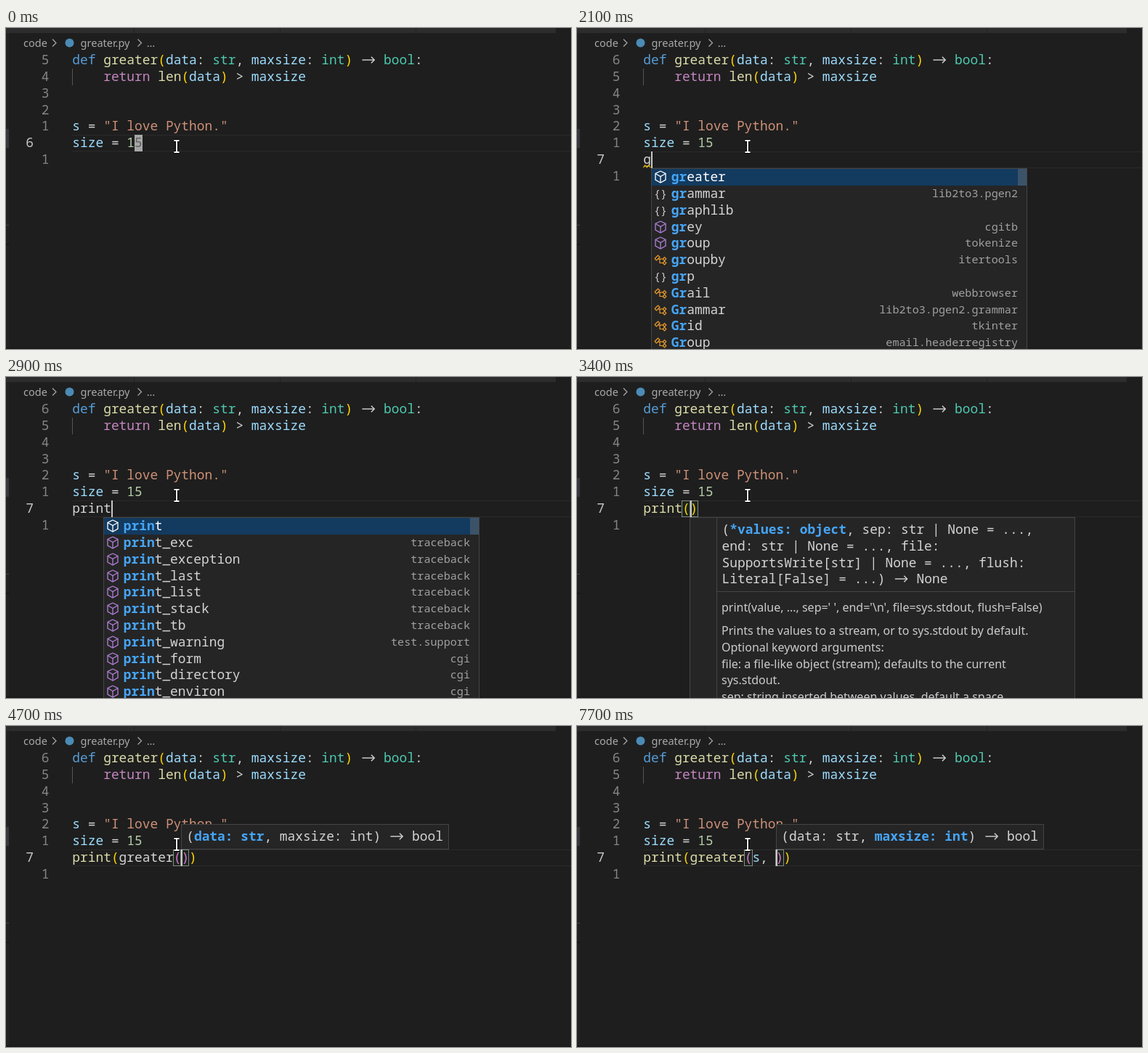
An HTML page with a canvas for the animation above (8 s loop, 778 by 442 pixels).

```html
<!DOCTYPE html>
<html lang="en">
<head>
<meta charset="utf-8">
<title>Editor completion</title>
<style>
html, body { margin: 0; height: 100%; overflow: hidden; background: #1e1e1e; }
canvas { display: block; }
</style>
</head>
<body>
<canvas id="stage" width="778" height="442"></canvas>
<script>
const ctx = document.getElementById('stage').getContext('2d');
const LOOP = 8000, LEFT = 91.3, CELL = 10.72, PITCH = 22.86;
const MONO = '"Noto Sans Mono", "DejaVu Sans Mono", monospace';
const SANS = '"Noto Sans", "Open Sans", sans-serif';
const CODE = `17.87px ${MONO}`, BOLD = `bold 17.87px ${MONO}`;
const C = {
  bg: '#1e1e1e', text: '#d4d4d4', key: '#569cd6', fn: '#dcdcaa', name: '#9cdcfe',
  type: '#4ec9b0', flow: '#c586c0', str: '#ce9178', num: '#b5cea8', p1: '#ffd700',
  p2: '#da70d6', panel: '#252526', edge: '#454545', match: '#46a5f5'
};

const colX = col => LEFT + col * CELL;
const pixX = col => Math.round(colX(col));
const rowTop = row => Math.round(32.8 + PITCH * row);
const base = row => Math.round(50 + PITCH * row);

function rect(x, y, w, h, color) {
  ctx.fillStyle = color;
  ctx.fillRect(x, y, w, h);
}

function frame(x, y, w, h, color) {
  ctx.strokeStyle = color;
  ctx.lineWidth = 1;
  ctx.strokeRect(x + .5, y + .5, w - 1, h - 1);
}

function panel(x, y, w, h) {
  rect(x, y, w, h, C.panel);
  frame(x, y, w, h, C.edge);
}

function text(s, x, y, color, font = CODE, align = 'left') {
  ctx.font = font;
  ctx.fillStyle = color;
  ctx.textAlign = align;
  ctx.fillText(s, x, y);
}

function line(points, color, width = 1.3) {
  ctx.strokeStyle = color;
  ctx.lineWidth = width;
  ctx.beginPath();
  points.forEach(([x, y], i) => i ? ctx.lineTo(x, y) : ctx.moveTo(x, y));
  ctx.stroke();
}

function diamond(x, y, r, color) {
  line([[x - r, y], [x, y - r], [x + r, y], [x, y + r], [x - r, y]], color, 1.2);
}

function arrow(x, y, color) {
  line([[x + 2.5, y - 6], [x + 19, y - 6]], color, 1.4);
  line([[x + 15, y - 10.3], [x + 19.3, y - 6], [x + 15, y - 1.7]], color, 1.4);
}

// Runs are [text, color, font]; "->" is drawn as one wide arrow.
function runs(x, y, list) {
  for (const [s, color = C.text, font = CODE] of list) {
    if (s === '->') arrow(x, y, color);
    else text(s, x, y, color, font);
    x += s.length * CELL;
  }
}

const program = [
  [['def ', C.key], ['greater', C.fn], ['(', C.p1], ['data', C.name], [': '], ['str', C.type], [', '],
   ['maxsize', C.name], [': '], ['int', C.type], [')', C.p1], [' '], ['->'], [' '], ['bool', C.type], [':']],
  [['    '], ['return ', C.flow], ['len', C.fn], ['(', C.p1], ['data', C.name], [')', C.p1], [' > '], ['maxsize', C.name]],
  [], [],
  [['s', C.name], [' = '], ['"I love Python."', C.str]],
  [['size', C.name], [' = '], ['15', C.num]]
];

// Completion entries: kind:label:detail (f function, c class, m module, v variable, k keyword)
const parse = s => s.split(' ').map(e => e.split(':'));
const lists = {
  gr: parse('f:greater m:grammar:lib2to3.pgen2 m:graphlib f:grey:cgitb f:group:tokenize c:groupby:itertools ' +
    'm:grp c:Grail:webbrowser c:Grammar:lib2to3.pgen2.grammar c:Grid:tkinter c:Group:email.headerregistry'),
  p: parse('k:pass f:pow f:print c:property f:pack:struct f:pack_into:struct v:packagePathMap:modulefinder ' +
    'f:packages_distributions:importlib.metadata f:pager:pydoc f:pair_content:curses f:pair_number:curses'),
  pr: parse('f:print c:property f:pread:os m:pprint m:profile f:prepare:sqlite3 v:PREFIXES:site ' +
    'c:PrettyPrinter:pprint f:print_exc:traceback f:print_tb:traceback c:Process:multiprocessing'),
  print: parse('f:print f:print_exc:traceback f:print_exception:traceback f:print_last:traceback f:print_list:traceback ' +
    'f:print_stack:traceback f:print_tb:traceback f:print_warning:test.support f:print_form:cgi ' +
    'f:print_directory:cgi f:print_environ:cgi'),
  s: parse('v:s v:size c:set f:setattr c:slice f:sorted c:staticmethod c:str f:sum c:super m:sched')
};

function icon(kind, x, y, selected) {
  if (kind === 'f') {
    const c = selected ? '#ffffff' : '#b180d7';
    line([[x, y - 8], [x + 7, y - 4.5], [x + 7, y + 4], [x, y + 8], [x - 7, y + 4], [x - 7, y - 4.5], [x, y - 8]], c);
    line([[x - 7, y - 4.5], [x, y - .5], [x + 7, y - 4.5]], c);
    line([[x, y - .5], [x, y + 8]], c);
  } else if (kind === 'c') {
    const c = '#ee9d28';
    line([[x - 8, y - 1.5], [x - 3.5, y - 6], [x - 1, y - 3.5], [x - 5.5, y + 1], [x - 8, y - 1.5]], c, 1.2);
    line([[x - 3, y - 1], [x + 3, y - 1]], c, 1.2);
    line([[x - 1, y - 1], [x - 1, y + 4.5], [x + 3, y + 4.5]], c, 1.2);
    diamond(x + 5.5, y - 1, 2.3, c);
    diamond(x + 5.5, y + 4.5, 2.3, c);
  } else if (kind === 'm') {
    text('{}', x, y + 5, '#cccccc', `15px ${MONO}`, 'center');
  } else if (kind === 'v') {
    const c = '#75beff';
    for (const d of [-1, 1])
      line([[x + d * 5, y - 5], [x + d * 8, y - 5], [x + d * 8, y + 5], [x + d * 5, y + 5]], c);
    line([[x - 4, y - 1], [x + 1, y - 3.5], [x + 4, y - 1.5], [x + 4, y + 1.5], [x - 1, y + 4], [x - 4, y + 2], [x - 4, y - 1]], c);
    line([[x - 4, y - 1], [x - 1, y + .5], [x + 4, y - 1.5]], c);
  } else {
    const c = selected ? '#ffffff' : '#cccccc';
    [[-8, -2], [1, 8], [-8, 3], [5, 8], [-8, -4], [-2, 8], [-8, 4]].forEach(([a, b], i) => {
      const dy = -6 + Math.floor(i / 2) * 4;
      line([[x + a, y + dy], [x + b, y + dy]], c, 1.4);
    });
  }
}

function popup([col, key, match]) {
  const x = pixX(col), w = 518;
  panel(x, 193, w, 260);
  rect(x + 1, 194, w - 2, 23, '#133a5f');
  rect(x + 505, 194, 12, 23, 'rgba(121,121,121,.4)');
  lists[key].forEach(([kind, label, detail], i) => {
    const y = Math.round(205.1 + i * 22.82), tx = x + 27.8;
    icon(kind, x + 13, y, !i);
    text(label.slice(0, match), tx, y + 6, C.match, BOLD);
    text(label.slice(match), tx + match * CELL, y + 6, i ? C.text : '#ffffff');
    if (detail) text(detail, x + 505, y + 5, '#a0a0a0', `15.15px ${MONO}`, 'right');
  });
}

const docs = [
  [323, "print(value, ..., sep=' ', end='\\n', file=sys.stdout, flush=False)"],
  [355, 'Prints the values to a stream, or to sys.stdout by default.'],
  [378, 'Optional keyword arguments:'],
  [401, 'file: a file-like object (stream); defaults to the current'],
  [423, 'sys.stdout.'],
  [446, 'sep: string inserted between values, default a space.']
];

function printHelp(col) {
  const x = pixX(col) - 1, tx = x + 44.5;
  panel(x, 193, 531, 260);
  rect(x + 37, 194, 1, 250, C.edge);
  rect(x + 37, 295, 493, 1, C.edge);
  runs(tx, 216, [['('], ['*values: object', C.match, BOLD], [', sep: str | None = ...,']]);
  runs(tx, 239, [['end: str | None = ..., file:']]);
  runs(tx, 262, [['SupportsWrite[str] | None = ..., flush:']]);
  runs(tx, 284, [['Literal[False] = ...) '], ['->'], [' None']]);
  for (const [y, s] of docs) text(s, tx - .5, y, '#cccccc', `16px ${SANS}`);
}

function tip([col, active]) {
  const x = pixX(col), on = i => i === active ? [C.match, BOLD] : [];
  panel(x, 135, 369, 35);
  runs(x + 7.2, 158, [['('], ['data: str', ...on(0)], [', '], ['maxsize: int', ...on(1)], [') '], ['->'], [' bool']]);
}

function squiggle(from, to) {
  const pts = [];
  for (let x = colX(from), i = 0; x <= colX(to); x += 2.5, i++) pts.push([x, i % 2 ? 189 : 192]);
  line(pts, '#cca700', 1.2);
}

function typed(s, known) {
  let depth = 0;
  return (s.match(/\w+|[^\w]/g) || []).map(w => {
    if (w === '(') return [w, ++depth > 1 ? C.p2 : C.p1];
    if (w === ')') return [w, depth-- > 1 ? C.p2 : C.p1];
    if (w === 'print' && s.includes('(')) return [w, C.fn];
    if (known && w === 'greater') return [w, C.fn];
    if (known && w === 's') return [w, C.name];
    return [w];
  });
}

// Each step changes only the listed fields.
const steps = [
  [0, { normal: true, src: '', at: 0, on: true, pop: null, help: null, tip: null, wave: null, pair: null, known: false, mark: false }],
  [200, { normal: false }],
  [700, { on: false }],
  [1200, { src: 'g', at: 1, on: true }],
  [1300, { src: 'gr', at: 2, pop: [1, 'gr', 2] }],
  [1400, { pop: [2, 'gr', 2] }],
  [1600, { wave: [0, 2] }],
  [1800, { on: false }],
  [2100, { src: 'g', at: 1, on: true, pop: [1, 'gr', 2], wave: [0, 1] }],
  [2200, { src: '', at: 0, pop: null, wave: null }],
  [2300, { src: 'p', at: 1, pop: [1, 'p', 1] }],
  [2600, { src: 'pr', at: 2, wave: [1.5, 2.5] }],
  [2700, { src: 'pri', at: 3, pop: [2, 'pr', 2], wave: null }],
  [2800, { src: 'prin', at: 4, pop: [3, 'print', 3] }],
  [2900, { src: 'print', at: 5, pop: [4, 'print', 4] }],
  [3000, { pop: [5, 'print', 5] }],
  [3200, { src: 'print()', at: 6, pop: null, pair: [5, 6] }],
  [3300, { help: 6 }],
  [3700, { src: 'print(g)', at: 7, pair: [5, 7] }],
  [3800, { src: 'print(gr)', at: 8, pair: [5, 8], help: 7 }],
  [3900, { pop: [8, 'gr', 2], help: 8 }],
  [4000, { src: 'print(gre)', at: 9, pair: [5, 9] }],
  [4100, { pop: [9, 'gr', 3], help: 9 }],
  [4300, { src: 'print(greater)', at: 13, pair: [5, 13], pop: null }],
  [4400, { src: 'print(greater())', at: 14, pair: [13, 14] }],
  [4500, { help: null }],
  [4600, { tip: [14, 0] }],
  [4900, { known: true }],
  [5100, { on: false }],
  [5600, { on: true }],
  [6100, { on: false }],
  [6600, { src: 'print(greater(s))', at: 15, on: true, pair: [13, 15] }],
  [6700, { tip: [15, 0] }],
  [6800, { pop: [15, 's', 1] }],
  [7100, { mark: true }],
  [7400, { src: 'print(greater(s,))', at: 16, pair: [13, 16], pop: null, mark: false }],
  [7500, { src: 'print(greater(s, ))', at: 17, pair: [13, 17], tip: [17, 0] }],
  [7700, { tip: [17, 1] }]
];

const stateAt = t => Object.assign({}, ...steps.filter(s => s[0] <= t).map(s => s[1]));

function chrome() {
  rect(0, 0, 778, 442, C.bg);
  rect(0, 0, 757, 7, '#2d2d2d');
  for (const x of [176, 377, 564]) rect(x, 0, 1, 7, '#222222');
  rect(0, 7, 4, 435, '#222223');
  rect(0, 139, 4, 26, '#37373d');
  rect(0, 271, 4, 1, '#444444');
  rect(0, 297, 4, 2, '#171717');
  rect(0, 440, 778, 2, '#191919');
  const font = `14.5px ${SANS}`, grey = '#a9a9a9';
  text('code', 24, 26, grey, font);
  text('greater.py', 102.6, 26, grey, font);
  text('…', 193.8, 26, grey, font);
  for (const x of [64, 181.5]) line([[x, 15.5], [x + 5, 20.5], [x, 25.5]], grey, 1.2);
  ctx.fillStyle = '#4b8bb5';
  ctx.beginPath();
  ctx.arc(87.5, 20.5, 6, 0, 7);
  ctx.fill();
}

function pointer() {
  for (const [color, w] of [['#000000', 4], ['#ffffff', 2]]) {
    line([[231.5, 155], [238.5, 155]], color, w);
    line([[235, 155], [235, 171]], color, w);
    line([[231.5, 171], [238.5, 171]], color, w);
  }
}

function draw(t) {
  const s = stateAt(t), row = s.normal ? 5 : 6, top = rowTop(row), left = pixX(0);
  chrome();
  rect(left, top, 778 - left, 1, '#2a2a2a');
  rect(left, top + 22, 778 - left, 1, '#2a2a2a');
  for (let r = 0; r <= row + 1; r++) {
    if (r === row) text(row + 1, 27.3, base(r), '#c6c6c6');
    else text(Math.abs(row - r), 59.5, base(r), '#858585', CODE, 'right');
  }
  rect(left, rowTop(1), 1, 23, '#555555');
  if (s.mark) {
    rect(left, rowTop(4), 11, 23, '#474747');
    rect(pixX(14), rowTop(6), 11, 23, '#474747');
  }
  program.forEach((code, r) => runs(LEFT, base(r), code));
  if (s.normal) {
    rect(pixX(8), 147, 11, 23, '#a6a6a6');
    text('5', colX(8), base(5), '#606060');
  } else {
    for (const col of s.pair || []) {
      rect(pixX(col) - 1, 170, 12, 23, 'rgba(0,100,0,.1)');
      frame(pixX(col) - 1, 170, 12, 23, '#888888');
    }
    runs(LEFT, base(6), typed(s.src, s.known));
    if (s.wave) squiggle(...s.wave);
    if (s.on) rect(pixX(s.at), 170, 2, 23, '#c8c8c8');
  }
  if (s.help !== null) printHelp(s.help);
  if (s.tip) tip(s.tip);
  if (s.pop) popup(s.pop);
  pointer();
}

const start = performance.now();
function tick() {
  draw((performance.now() - start) % LOOP);
  requestAnimationFrame(tick);
}
tick();
</script>
</body>
</html>
```
